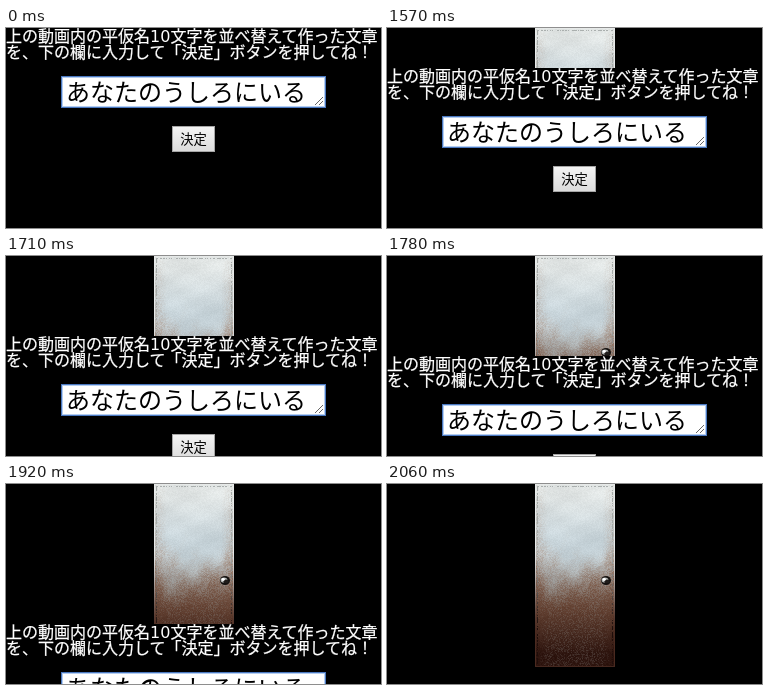
An HTML page with a canvas that plays this animation: 375 by 200 pixels, repeating every 2130 ms.

```html
<!DOCTYPE html>
<html lang="ja">
<head>
<meta charset="utf-8">
<title>決定</title>
<style>
  html, body { margin: 0; width: 100%; height: 100%; overflow: hidden; background: #000; }
  .stage { position: absolute; left: 0; top: 0; width: 375px; height: 200px; overflow: hidden; }
  #door { position: absolute; left: 148px; top: 0; }
  .page { position: absolute; left: 0; top: 0; animation: drop 2130ms step-end infinite; }
  text { font-family: "Noto Sans CJK JP", "Noto Sans CJK", sans-serif; white-space: pre; }
  .prompt { font-size: 16px; fill: #fff; stroke: #fff; stroke-width: .25px; }
  .digits { font-family: "DejaVu Sans", sans-serif; stroke: none; }
  .answer { font-size: 24px; fill: #000; }
  .label { font-size: 13.33px; fill: #000; text-anchor: middle; }

  /* The page falls one 20px notch every 70ms, then leaves the stage. */
  @keyframes drop {
    0% { transform: translateY(0); }
    70.422% { transform: translateY(20px); }
    73.708% { transform: translateY(40px); }
    76.995% { transform: translateY(60px); }
    80.281% { transform: translateY(80px); }
    83.568% { transform: translateY(100px); }
    86.854% { transform: translateY(120px); }
    90.140% { transform: translateY(140px); }
    93.427% { transform: translateY(180px); }
    96.713%, 100% { transform: translateY(200px); }
  }
</style>
</head>
<body>
<div class="stage">
  <canvas id="door" width="80" height="183"></canvas>
  <svg class="page" width="375" height="200" viewBox="0 0 375 200">
    <defs>
      <linearGradient id="face" x2="0" y2="1">
        <stop offset="0" stop-color="#f4f4f4"/>
        <stop offset="1" stop-color="#dcdcdc"/>
      </linearGradient>
    </defs>
    <rect width="375" height="200"/>
    <text class="prompt" y="14">上の動画内の平仮名<tspan class="digits">10</tspan>文字を並べ替えて作った文章</text>
    <text class="prompt" y="30">を、下の欄に入力して「決定」ボタンを押してね！</text>
    <rect x="55.5" y="48.5" width="264" height="31" fill="#fff" stroke="#4a78c0"/>
    <rect x="56.5" y="49.5" width="262" height="29" fill="none" stroke="#b4cdf0"/>
    <text class="answer" x="60" y="73">あなたのうしろにいる</text>
    <path d="M309 77l8-8M313 77l4-4" fill="none" stroke="#666"/>
    <rect x="166.5" y="98.5" width="42" height="25" fill="url(#face)" stroke="#a6a6a6"/>
    <text class="label" x="187.5" y="116">決定</text>
  </svg>
</div>
<script>
  const canvas = document.getElementById('door');
  const ctx = canvas.getContext('2d');
  const { width, height } = canvas;

  let seed = 20;
  const random = () => (seed = (seed * 16807) % 2147483647) / 2147483647;
  const clamp = v => Math.min(1, Math.max(0, v));
  const smooth = v => { v = clamp(v); return v * v * (3 - 2 * v); };
  const mix = (a, b, t) => a.map((v, i) => v + (b[i] - v) * t);
  const dot = (x, y, color, w = 1, h = 1) => {
    ctx.fillStyle = `rgb(${color.map(Math.round)})`;
    ctx.fillRect(x, y, w, h);
  };

  const cloud = (x, y) => Math.sin(x * .09 + y * .07 + 2)
    + .6 * Math.sin(x * .21 - y * .11) + .4 * Math.sin(x * .37 + y * .17);
  const steelAt = y => y < 65
    ? mix([226, 230, 229], [198, 211, 217], smooth(y / 65))
    : mix([198, 211, 217], [135, 135, 132], smooth((y - 65) / 65));
  const rustAt = y => y < 125
    ? mix([168, 140, 122], [98, 64, 49], clamp((y - 65) / 60))
    : mix([98, 64, 49], [45, 20, 14], clamp((y - 125) / 45));

  for (let y = 0; y < height; y++) {
    for (let x = 0; x < width; x++) {
      const edge = Math.min(x, width - 1 - x);
      const spread = smooth((y - 58 + 7 * cloud(x, y)) / 75);
      const border = .35 * clamp(1 - edge / 12) * clamp((y + 10) / 70);
      const speckle = (random() - .5) * .55 * Math.sqrt(spread + border);
      const base = steelAt(y).map(v => v + 4 * cloud(y, x) * (1 - spread));
      const tone = mix(base, rustAt(y), clamp(spread + border + speckle));
      const grain = (random() - .5) * 9;
      dot(x, y, tone.map(v => Math.min(255, Math.max(0, v + grain))));
    }
  }

  // Worn frame: a pale rim with a broken groove inside it
  for (let y = 0; y < height; y++) {
    const fade = smooth((y - 60) / 90);
    const rim = mix([232, 235, 234], [74, 42, 32], fade);
    const groove = mix([165, 170, 168], [30, 13, 10], fade);
    for (const x of [0, width - 1]) dot(x, y, rim);
    for (const x of [2, width - 3]) if (random() < .6) dot(x, y, groove);
  }
  dot(0, 0, [230, 233, 232], width);
  for (let x = 2; x < width - 2; x++) {
    if (random() < .6) dot(x, 2, [170, 175, 174]);
  }
  dot(0, height - 1, [70, 40, 31], width);

  const oval = (x, y, rx, ry, color) => {
    ctx.fillStyle = color;
    ctx.beginPath();
    ctx.ellipse(x, y, rx, ry, 0, 0, 7);
    ctx.fill();
  };
  oval(71, 96.5, 5, 4.5, '#14110f');
  oval(70, 96, 3.4, 2.6, '#b9bcbb');
  oval(72, 97.4, 2.6, 1.9, '#201d1b');
  oval(69.2, 95.4, 1.6, 1.3, '#fff');
</script>
</body>
</html>
```
